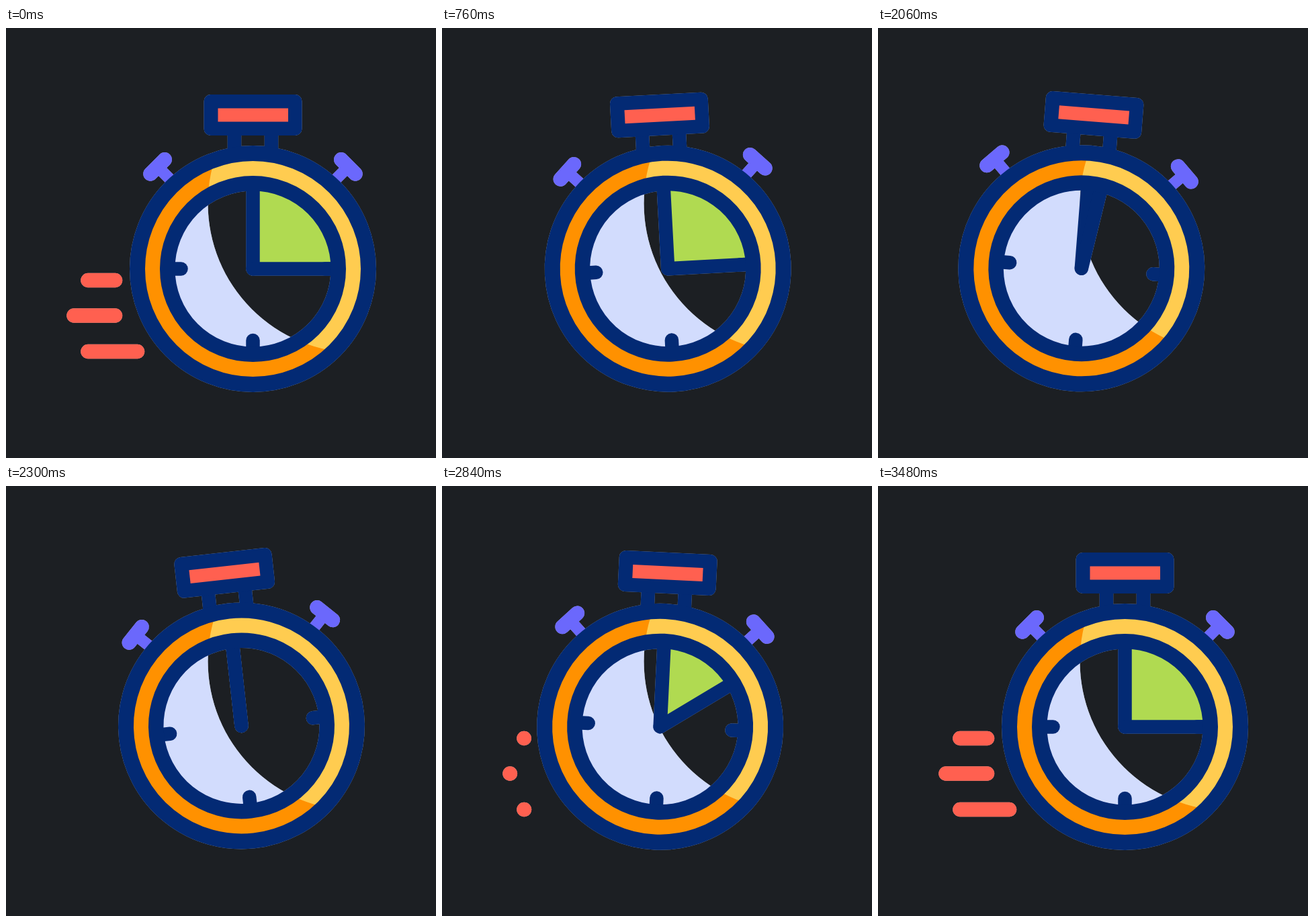
Write an HTML page with a canvas that moves like this. It is 640x640 px and loops after 3600 ms.

```html
<!DOCTYPE html>
<html lang="en">
<head>
<meta charset="utf-8">
<title>Stopwatch</title>
<style>
  html, body { margin: 0; width: 100%; height: 100%; overflow: hidden; background: #1c1f23; }
  canvas { display: block; width: 640px; height: 640px; }
</style>
</head>
<body>
<canvas id="stage" width="640" height="640"></canvas>
<script>
const SIZE = 640, LOOP = 3600, TAU = Math.PI * 2;
const BG = '#1c1f23', NAVY = '#032a74', RED = '#ff6050', GREEN = '#b0da51',
      ORANGE = '#ff9100', YELLOW = '#ffcc50', LAVENDER = '#d2dcfd', PURPLE = '#6b68fc';
const PIVOT_Y = 107, HUB_DROP = 251.5, STROKE = 20.5;
const SHADE = { x: 523, y: 261, r: 222.5 };

const stage = document.getElementById('stage').getContext('2d');
const layer = document.createElement('canvas');
layer.width = layer.height = SIZE;
const g = layer.getContext('2d');

// Keys are [time, value, settle]; a smaller settle gives a longer ease-out.
const SHIFT = [[0, 44.75], [285, 0], [2645, 0], [3170, 44.75]];
const TILT = [[0, 0], [285, 18], [589, -7.9], [1100, 0, 0.1], [1620, 0], [1950, 6.9],
              [2390, -7.9], [2645, 8], [3158, -8], [3480, 0, 0.1]];
const HAND = [[1100, 90], [2300, 0], [2385, 0], [3165, 90]];
const TRAIL = [[0, 1], [285, 0], [2825, 0], [3165, 1]];
const TRAIL_LINES = [[122, 162.5, 375.5], [101, 162.5, 428], [122, 195.5, 481.5]];

function ease(x, settle = 2 / 3) {
  let lo = 0, hi = 1;
  for (let i = 0; i < 24; i++) {
    const s = (lo + hi) / 2, r = 1 - s;
    if (r * r * s + 3 * r * s * s * settle + s * s * s < x) lo = s; else hi = s;
  }
  return lo * lo * (3 - 2 * lo);
}

function track(keys, t) {
  const next = keys.findIndex(k => k[0] > t);
  if (next < 0) return keys[keys.length - 1][1];
  if (next === 0) return keys[0][1];
  const [t0, v0] = keys[next - 1], [t1, v1, settle] = keys[next];
  return v0 + (v1 - v0) * ease((t - t0) / (t1 - t0), settle);
}

function line(c, color, width, x0, y0, x1, y1, cap = 'round') {
  c.strokeStyle = color;
  c.lineWidth = width;
  c.lineCap = cap;
  c.beginPath();
  c.moveTo(x0, y0);
  c.lineTo(x1, y1);
  c.stroke();
}

function ring(color, inner, outer) {
  g.strokeStyle = color;
  g.lineWidth = outer - inner;
  g.beginPath();
  g.arc(0, 0, (inner + outer) / 2, 0, TAU);
  g.stroke();
}

function drawFace(hubX, hubY) {
  g.save();
  g.fillStyle = LAVENDER;
  g.beginPath();
  g.arc(hubX, hubY, 120, 0, TAU);
  g.fill();
  g.globalCompositeOperation = 'destination-out';
  g.beginPath();
  g.arc(SHADE.x, SHADE.y, SHADE.r, 0, TAU);
  g.fill();
  g.restore();
}

function drawRim(hubX, hubY) {
  g.save();
  g.translate(hubX, hubY);
  ring(YELLOW, 136, 163);
  g.translate(-hubX, -hubY);
  g.beginPath();
  g.rect(0, 0, SIZE, SIZE);
  g.arc(SHADE.x, SHADE.y, SHADE.r, 0, TAU);
  g.clip('evenodd');
  g.translate(hubX, hubY);
  ring(ORANGE, 136, 163);
  g.restore();
}

function drawTop() {
  for (const side of [-1, 1]) {
    line(g, PURPLE, 17, side * 142, -152, side * 115, -125, 'butt');
    line(g, PURPLE, 21.5, side * 131.3, -162.7, side * 152.5, -141.5);
    line(g, NAVY, STROKE, side * 27.5, -205, side * 27.5, -168, 'butt');
  }
  g.fillStyle = NAVY;
  g.beginPath();
  g.roundRect(-73, -259.5, 146, 61, 10);
  g.fill();
  g.fillStyle = RED;
  g.fillRect(-52, -239, 104.5, 20);
}

function drawDial(angle) {
  g.fillStyle = GREEN;
  g.beginPath();
  g.moveTo(0, 0);
  g.arc(0, 0, 120, -TAU / 4, angle - TAU / 4);
  g.fill();
  line(g, NAVY, STROKE, -122, 0, -107, 0);
  line(g, NAVY, STROKE, 122, 0, 107, 0);
  line(g, NAVY, STROKE, 0, 122, 0, 106.5);
  line(g, NAVY, STROKE, 0, 0, 0, -125);
  line(g, NAVY, STROKE, 0, 0, 125 * Math.sin(angle), -125 * Math.cos(angle));
  ring(NAVY, 116, 138.5);
  ring(NAVY, 160.5, 183.5);
}

function drawTrail(t) {
  const grow = track(TRAIL, t);
  if (t >= 285 && t < 2820) return;
  for (const [x0, x1, y] of TRAIL_LINES) {
    line(g, RED, 21.5, x0, y, x0 + Math.max(0.01, (x1 - x0) * grow), y);
  }
}

function draw(t) {
  const tilt = track(TILT, t) * TAU / 360;
  const hubX = 322.75 + track(SHIFT, t) - HUB_DROP * Math.sin(tilt);
  const hubY = PIVOT_Y + HUB_DROP * Math.cos(tilt);

  g.clearRect(0, 0, SIZE, SIZE);
  drawFace(hubX, hubY);
  drawTrail(t);
  g.save();
  g.translate(hubX, hubY);
  g.rotate(tilt);
  drawTop();
  g.restore();
  drawRim(hubX, hubY);
  g.save();
  g.translate(hubX, hubY);
  g.rotate(tilt);
  drawDial(track(HAND, t) * TAU / 360);
  g.restore();

  // A faint light edge surrounds every shape.
  stage.shadowColor = 'transparent';
  stage.fillStyle = BG;
  stage.fillRect(0, 0, SIZE, SIZE);
  stage.shadowColor = 'rgba(255, 255, 255, 0.6)';
  stage.shadowBlur = 1;
  stage.drawImage(layer, 0, 0);
}

const start = performance.now();
function frame() {
  draw((performance.now() - start) % LOOP);
  requestAnimationFrame(frame);
}
frame();
</script>
</body>
</html>
```
